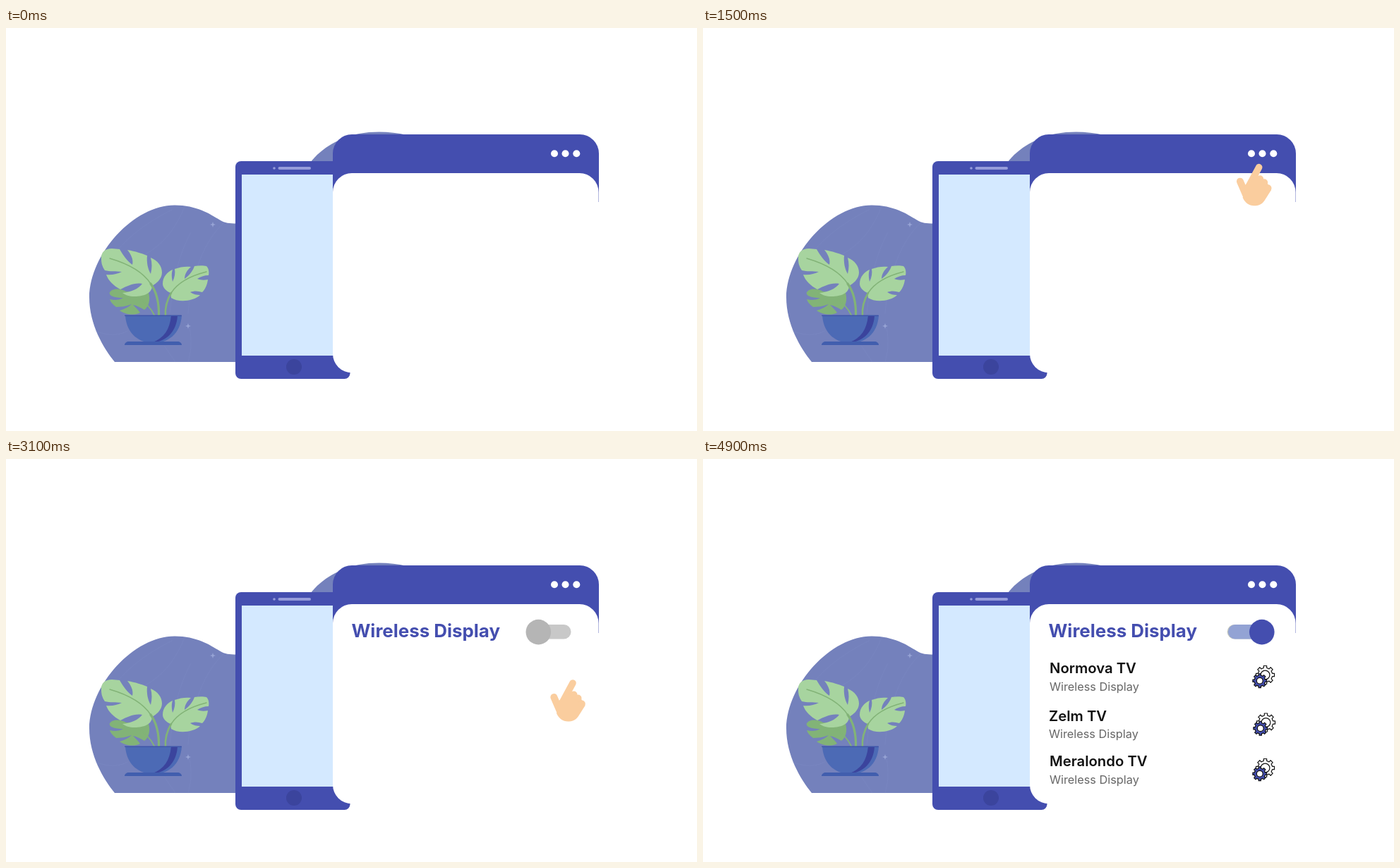
Write an HTML page with a canvas that moves like this. It is 979 by 572 pixels and loops after 5150 ms.

```html
<!DOCTYPE html>
<html lang="en">
<head>
<meta charset="utf-8">
<title>Wireless Display</title>
<style>
  html, body { margin: 0; width: 100%; height: 100%; overflow: hidden; background: #fff; }
  canvas { display: block; }
</style>
</head>
<body>
<canvas id="stage" width="979" height="572"></canvas>
<script>
const ctx = document.getElementById('stage').getContext('2d');
const LOOP = 5150, STEP = 100;
const BLUE = '#444eaf', LEAF = '#a7d49f', STEM = '#82b377', BLOB = '#7481bc', SKIN = '#facd9e';

// Each approach: [time, left, top], linear between points.
const approaches = [
  { end: 2200, keys: [[200, 934, 350], [700, 814, 310], [800, 790, 301.5], [1300, 759, 226], [1600, 754, 176]] },
  { end: 4000, keys: [[2600, 903, 361], [3100, 771, 313], [3200, 746, 303], [3500, 720, 270], [3700, 719, 246]] }
];
const taps = [[1800, 2000, 786, 178.5], [3800, 4000, 754, 248]];
const rows = [
  { at: 4400, x: 491, y: 304, name: 'Normova TV', dx: 0 },
  { at: 4650, x: 490, y: 371.5, name: 'Zelm TV', dx: 1 },
  { at: 4900, x: 491, y: 436, name: 'Meralondo TV', dx: 0 }
];

function fill(d, color) {
  ctx.fillStyle = color;
  ctx.fill(new Path2D(d));
}
function stroke(d, color, width) {
  ctx.strokeStyle = color;
  ctx.lineWidth = width;
  ctx.lineCap = ctx.lineJoin = 'round';
  ctx.stroke(new Path2D(d));
}
function disc(x, y, r, color) {
  ctx.fillStyle = color;
  ctx.beginPath();
  ctx.arc(x, y, r, 0, Math.PI * 2);
  ctx.fill();
}
function box(x, y, w, h, r, color) {
  ctx.fillStyle = color;
  ctx.beginPath();
  ctx.roundRect(x, y, w, h, r);
  ctx.fill();
}
function text(str, x, y, font, color) {
  ctx.font = font + ' Inter, "Noto Sans", sans-serif';
  ctx.fillStyle = color;
  ctx.fillText(str, x, y);
}
const mix = (a, b, p) => a + (b - a) * p;
function blend(a, b, p) {
  return `rgb(${a.map((v, i) => Math.round(mix(v, b[i], p))).join()})`;
}

function drawBackdrop() {
  fill('M154 474C138 454 118 421 118 382C119 320 181 251.5 239 251.5C270 251.5 289 264 303 272.5C310 277 317 277.5 326 277.5V474Z', BLOB);
  fill('M431 191C447 170 474 155 500 150C522 146 547 147 568 152V192Z', BLOB);
  const faint = 'rgba(150,165,215,.13)';
  stroke('M252 256C238 290 215 320 168 333M235 258C195 278 166 302 150 326', faint, 1);
  stroke('M262 290C240 330 236 372 232 405M308 277C282 300 262 350 258 405', faint, 1);
  stroke('M260 425C264 445 262 460 258 474M225 452L240 474M126 430C145 437 160 437 172 430', faint, 1);
  for (const [x, y] of [[293, 279], [258, 423]])
    fill(`M${x} ${y - 4}L${x + 1} ${y - 1}L${x + 4} ${y}L${x + 1} ${y + 1}L${x} ${y + 4}L${x - 1} ${y + 1}L${x - 4} ${y}L${x - 1} ${y - 1}Z`, '#97a4d5');
}

function drawPlant() {
  fill('M146.500 376C150 369 162 369 170 374L202 376C205 386 202 396 196 400C191 397 185 394 180 393C184 397 188 401 190 404C181 409 168 406 161 401C168 399 174 396 178 392C170 395 162 396 156 396C151 392 148 389 147 385C154 387 161 386 166 383C158 383 147 382 146.500 376Z', STEM);
  stroke('M186 382C197 388 205 397 211 409', STEM, 1.8);

  fill('M135 328C134 318 141 313 150 313L161 314C166 323 172 331 179 336C181 329 177 321 172 315C183 317 193 320 200 323C199 333 201 342 205 349C207 341 207 333 205 326C215 330 221 338 221 347C221 357 212 363 207 366C207 376 196 381 182 381C175 381 169 379 165 376C177 375 188 370 193 363C182 361 172 366 162 371C153 366 145 359 142 350C150 351 158 349 164 346C156 345 147 346 140 344C136 338 135 333 135 328Z', LEAF);
  stroke('M147 327C171 334 194 346 205 363', STEM, 1.4);
  stroke('M205 363C213 374 217 390 216.500 409', STEM, 3.2);

  fill('M222 363C222 353 229 346 236 343C234 349 235 355 236 360C239 354 240 348 239 342C247 339 255 338 262 339C256 344 253 350 253 356C260 351 265 344 267 338C273 337 280 337 284 338C287 341 288 346 287 351C281 351 275 353 271 356C276 358 281 358 286 357C285 365 282 371 278 375C272 373 266 373 261 375C266 378 270 379 275 379C266 388 244 390 234 383L233 376C228 374 222 369 222 363Z', LEAF);
  stroke('M284 346C260 352 243 362 234 376', STEM, 1.4);
  stroke('M234 376C228 386 225 396 226 409', STEM, 2.6);

  fill('M169 408H249C247 435 229 447 209 447C189 447 171 435 169 408Z', '#4c6ab5');
  fill('M234 408H243C242 431 226 446 208 446C224 440 232 428 234 408Z', '#3b449d');
  box(168, 407.5, 81, 1.5, .7, '#3f56a9');
  fill('M168 450C168 447 171 445 174 445H243C246 445 249 447 249 450Z', '#415eae');
}

function drawDevices() {
  box(325, 189, 162.5, 309, 8, BLUE);
  ctx.fillStyle = '#d4e9ff';
  ctx.fillRect(334, 208, 140, 257);
  disc(380, 199, 1.8, '#969cda');
  box(385.5, 197, 46.5, 4, 2, '#969cda');
  disc(408, 481, 11, '#3b449d');

  box(463, 151, 377, 96, [27, 27, 0, 0], BLUE);
  box(463, 206, 376.6, 283.3, 27, '#fff');
  for (const x of [777, 792.5, 808.3]) disc(x, 178.3, 5, '#fff');
}

function drawToggle(p, listed) {
  if (listed) box(742.7, 235, 57, 20.5, 10.2, '#bfc4bd');
  box(744, 235, 56.5, 20.5, 10.2, blend([200, 200, 200], [147, 163, 212], p));
  disc(mix(754.3, 791.8, p), 245.6, 17.8, blend([181, 181, 181], [68, 78, 175], p));
}

function gear(x, y, r, hole, body) {
  const teeth = 8, pitch = Math.PI * 2 / teeth;
  ctx.beginPath();
  for (let i = 0; i < teeth; i++) {
    for (const [turn, size] of [[-.27, .78], [-.21, 1], [.21, 1], [.27, .78]]) {
      const a = (i + turn) * pitch;
      ctx.lineTo(x + Math.cos(a) * r * size, y + Math.sin(a) * r * size);
    }
  }
  ctx.closePath();
  ctx.fillStyle = body;
  ctx.strokeStyle = '#111';
  ctx.lineWidth = 1.2;
  ctx.lineJoin = 'round';
  ctx.fill();
  ctx.stroke();
  disc(x, y, hole, '#fff');
  ctx.stroke();
}

function drawRow({ x, y, name, dx }) {
  text(name, x, y, '600 20.3px', '#111');
  text('Wireless Display', x, y + 24.5, '400 16.3px', '#666');
  gear(796.5 + dx, y + 2.5, 13.2, 6.4, '#fff');
  gear(788.8 + dx, y + 10.8, 10, 4.4, BLUE);
}

function drawHand(x, y) {
  ctx.save();
  ctx.translate(x, y);
  stroke('M32 5L18 31', SKIN, 9.6);
  stroke('M5.3 25L13.5 44', SKIN, 10);
  fill('M12.5 30L31 17L43 26L49.5 37L40 52C36 58 31 59.500 25 59.500C18 59.500 12 55 9 48Z', SKIN);
  disc(33.5, 21.5, 5, SKIN);
  disc(39.5, 26.5, 5, SKIN);
  disc(44.8, 34.5, 5, SKIN);
  ctx.restore();
}

function drawTap(x, y) {
  for (let i = 0; i < 8; i++) {
    const a = i * Math.PI / 4, cx = Math.cos(a), cy = Math.sin(a);
    stroke(`M${x + cx * 11} ${y + cy * 11}L${x + cx * 19} ${y + cy * 18}`, '#fff', 2.4);
  }
}

function handAt(keys, t) {
  const next = keys.findIndex(k => k[0] > t);
  if (next < 0) return keys[keys.length - 1].slice(1);
  const a = keys[next - 1], b = keys[next], p = (t - a[0]) / (b[0] - a[0]);
  return [mix(a[1], b[1], p), mix(a[2], b[2], p)];
}

function draw(t) {
  const tick = Math.floor(t / STEP) * STEP;
  ctx.fillStyle = '#fff';
  ctx.fillRect(0, 0, 979, 572);
  drawBackdrop();
  drawPlant();
  drawDevices();
  if (t >= 2400) {
    text('Wireless Display', 489.5, 253, '700 25.9px', BLUE);
    const on = Math.min(1, Math.max(0, (tick - 3900) / 400));
    drawToggle(on, t >= 4400);
  }
  rows.filter(r => t >= r.at).forEach(drawRow);
  for (const [from, to, x, y] of taps) if (t >= from && t < to) drawTap(x, y);
  for (const { keys, end } of approaches)
    if (t >= keys[0][0] && t < end) drawHand(...handAt(keys, tick));
}

const start = performance.now();
function frame() {
  draw((performance.now() - start) % LOOP);
  requestAnimationFrame(frame);
}
frame();
</script>
</body>
</html>
```
